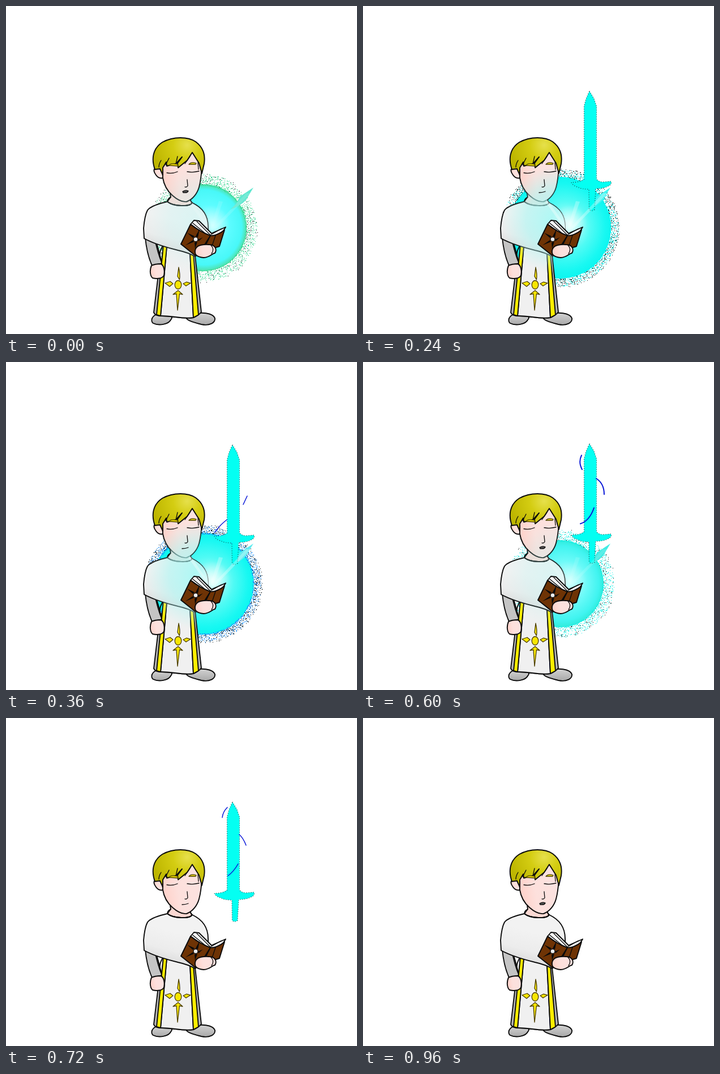
An HTML page that plays this animation: 620 by 580 pixels, repeating every 1.08 s.

```html
<!DOCTYPE html>
<html lang="en">
<head>
<meta charset="utf-8">
<title>Priest summoning a sword</title>
<style>
html, body { margin: 0; width: 100%; height: 100%; overflow: hidden; background: #fff; }
svg { display: block; width: 620px; height: 580px; }
.ink { stroke: #0a0a0a; stroke-width: 1.9; stroke-linejoin: round; stroke-linecap: round; }
.line { fill: none; }
.thin { stroke-width: 1.3; }
.dots { shape-rendering: crispEdges; }
</style>
</head>
<body>
<svg id="stage" viewBox="0 0 620 580">
  <defs>
    <radialGradient id="aura" gradientUnits="userSpaceOnUse" cx="348" cy="392" r="88" fx="366" fy="388">
      <stop id="core" offset="0"/><stop id="mid" offset=".5"/>
      <stop id="rim" offset=".86"/><stop id="edge" offset="1"/>
    </radialGradient>
    <radialGradient id="wash" gradientUnits="userSpaceOnUse" cx="340" cy="378" r="95">
      <stop offset="0" stop-color="#9ffaf6"/>
      <stop offset=".55" stop-color="#aef5f2" stop-opacity=".75"/>
      <stop offset="1" stop-color="#b8f5f2" stop-opacity="0"/>
    </radialGradient>
    <radialGradient id="flare">
      <stop offset="0" stop-color="#fff" stop-opacity=".9"/>
      <stop offset="1" stop-color="#fff" stop-opacity="0"/>
    </radialGradient>
    <radialGradient id="hairFill" gradientUnits="userSpaceOnUse" cx="320" cy="246" r="62">
      <stop offset="0" stop-color="#e6e04c"/><stop offset=".4" stop-color="#d4cd12"/>
      <stop offset="1" stop-color="#bdb500"/>
    </radialGradient>
    <linearGradient id="skin" x1="0" y1=".6" x2="1" y2=".4">
      <stop offset="0" stop-color="#ffd0c8"/><stop offset=".4" stop-color="#fde0dc"/>
      <stop offset="1" stop-color="#fbe2e0"/>
    </linearGradient>
    <linearGradient id="cloth" x1=".35" y1="1" x2=".55" y2=".35">
      <stop offset="0" stop-color="#d4d4d4"/><stop offset=".5" stop-color="#ececec"/>
      <stop offset="1" stop-color="#f2f2f2"/>
    </linearGradient>
    <linearGradient id="shoe" x1="0" y1="0" x2="0" y2="1">
      <stop offset="0" stop-color="#d2d2d2"/><stop offset="1" stop-color="#a8a8a8"/>
    </linearGradient>
    <path id="face" d="M276 276L277 304C279 317 285 327 294 335C303 343 312 347 319 346C330 342 338 331 341 320C344 309 345 300 346 285L331 255L290 258Z"/>
    <path id="cape" d="M285 346C272 349 255 354 250 361Q245 370 243 393L244 411C260 420 284 427 304 432Q322 436 334 443L358 425L357 390C357 373 350 358 329 348Q326 354 308 353Q292 352 285 346Z"/>
    <path id="robe" d="M278 424L273 470L268 483L261 542Q264 548 273 548C290 547 312 554 331 551Q341 547 345 541L334 441Z"/>
    <path id="neck" d="M290 331L291 338L285 346Q293 353 310 353Q326 353 328 348L325 342Z"/>
    <clipPath id="body"><use href="#face"/><use href="#cape"/><use href="#robe"/><use href="#neck"/></clipPath>
  </defs>

  <g id="glow">
    <circle id="disc" cx="348" cy="392" fill="url(#aura)"/>
    <path id="tint" class="dots"/>
    <path id="soot" class="dots" fill="#081010"/>
    <path id="shard" d="M437 321L413 337Q408 350 396 360Q415 353 424 343Z"/>
  </g>
  <path id="sword" fill="#04fff2" stroke="#101818" stroke-width="1.1" stroke-dasharray="1 3" d="M400 146.500L408 160L412.500 173V302Q417 308 426 307L438 306Q440 312 432 315Q424 319 411 319L409 356Q404 360 399.500 356L399 320Q386 320 379 316Q371 314 368 308Q384 308 390.500 302V173L394 160Z"/>
  <path id="sparks" fill="none" stroke="#0a18d8" stroke-linecap="round"/>

  <g class="ink">
    <path fill="url(#shoe)" d="M264 546C256 551 256 558 260 561C270 566 287 563 291 555Q295 551 291 547Z"/>
    <path fill="url(#shoe)" d="M318 551C320 557 334 560 345 563C360 566 370 560 369 552C366 545 355 542 341 543Z"/>
    <path fill="#c4c4c4" d="M246 410C248 430 252 446 258 459L276 455C270 444 268 432 263 414Z"/>
    <path fill="none" d="M265 416Q270 432 274 449M277 424Q267 440 276 453"/>
    <use href="#robe" fill="#b4b4b4"/>
    <path fill="#f0f0f0" d="M284 424L273 548C290 547 312 554 331 551L325 436Z"/>
    <path fill="#ffee00" d="M278 423L284 425L273 548L266 546ZM325 436L331 438L340 546L331 551Z"/>
    <path fill="url(#skin)" d="M257 459C253 468 255 478 259 481C267 483 277 482 279 476C281 467 278 457 273 456Q263 456 257 459Z"/>
    <g class="thin" fill="#f7e600" stroke="#4a3c00">
      <path d="M305 462Q308 475 306.500 484L303 478ZM281 490L290 487L295 491L289 496ZM313 491L319 488L326 490L318 495Z"/>
      <path d="M304 503L312 510L306.500 509L303 538L301 509L295 510Z"/>
      <ellipse cx="304" cy="493" rx="5.800" ry="7.500"/>
    </g>
    <use href="#neck" fill="#fbd8d2"/>
    <use href="#cape" fill="url(#cloth)"/>
    <path fill="none" d="M291 338Q285 341 285 346Q294 353 310 353Q325 354 329 348L325 343"/>
    <path fill="url(#skin)" d="M278 304Q270 306 265 299Q259 291 263 287L277 287Z"/>
    <use href="#face" fill="url(#skin)"/>
  </g>
  <rect id="veil" x="240" y="260" width="120" height="230" fill="url(#wash)" clip-path="url(#body)"/>
  <g id="rays" fill="#fff">
    <circle cx="364" cy="384" r="32" fill="url(#flare)"/>
    <path d="M363 396L424 331L432 331L369 396Z" opacity=".45"/>
    <path d="M361 394L376 345L383 346L366 394Z" opacity=".4"/>
    <path d="M356 394L322 346L327 344L361 394Z" opacity=".5"/>
  </g>
  <g class="ink">
    <path fill="url(#hairFill)" d="M263 289C257 272 258 253 276 241C296 230 322 231 335 240C350 251 352 266 350 279L346 296L341 278L329 259L320 273L304 286L303 278L311 267L300 279L284 283L283 276L277 286V299L272 288Z"/>
    <path class="line thin" d="M270 285Q270 279 274 273M282 281L288 269M300 279L303 266M316 279L325 266M339 277L340 289"/>
    <path class="thin" stroke="#4a4300" fill="#f2dc00" d="M288 282Q291 277 303 280L304 283ZM323 280Q327 275 336 278L335 280Z"/>
    <path class="line thin" d="M284 295Q294 297 303 293M320 293Q330 295 341 292M320 307L321 318Q319 321 316 320"/>
    <path id="mouth" class="thin"/>
    <path fill="#f6f6f6" d="M326 386L332 379L341 380L363 402L388 391L383 399L360 410Z"/>
    <path class="line thin" d="M337 381L361 405L380 394M330 384L358 407"/>
    <path fill="#6e3305" d="M326 386L309 421L334 441L350 426L361 406Q342 399 326 386ZM361 406Q372 407 386 396L377 425L358 431L349 425Z"/>
    <path class="line thin" d="M361 406L351 427M370 406L363 427"/>
    <path fill="#0a0a0a" stroke="none" d="M320 401L333 407L330 410ZM342 394L339 409L335 407ZM348 409L339 413L340 416ZM317 423L330 414L332 417ZM334 429L333 418L338 417Z"/>
    <circle class="thin" cx="335" cy="412.500" r="4" fill="#eee"/>
    <path fill="url(#skin)" d="M334 433C335 424 345 421 359 422C370 422 373 431 369 437C363 438 361 444 349 445C338 444 333 440 334 433Z"/>
    <path class="line thin" d="M362 423Q369 430 363 438"/>
  </g>
</svg>
<script>
const $ = id => document.getElementById(id);
const STEP = 120;

const small = { r: 77, spread: 20, veil: .3, rays: .3, soot: 260 };
const large = { r: 90, spread: 15, veil: .85, rays: .7, soot: 1000,
  stops: ['#d0fffa', '#50faf4', '#18f8f2', '#0cf6f0'] };

const looks = {
  green: { ...small, stops: ['#c0ffff', '#5cfcff', '#48f8f8', '#50e0a8'], dot: '#3cd894', shard: '#60e8d0' },
  cyan: { ...large, dot: '#04f4f0', shard: '#40f6f2' },
  blue: { ...large, dot: '#1e90ff', shard: '#60ecf0' },
  waning: { ...large, r: 84, veil: .6, rays: .5, soot: 600, dot: '#18c8f0', shard: '#50ecec' },
  pale: { ...small, stops: ['#c8fffc', '#6cfaf8', '#40f4f0', '#30ecdc'], dot: '#18eee4', shard: '#40ece4' }
};

const early = 'M426 237L419 252M390 279Q378 288 369 301';
const wide = 'M386 165Q380 177 387 190M412 206Q426 215 426 234M408 258Q400 281 384 286';
const tight = 'M391 158Q383 166 382 176M412 206Q419 212 424 225M410 258Q402 272 392 279';

// y: sword offset, behind: sword still inside the glow, open: mouth
const steps = [
  { look: 'green', open: true },
  { look: 'cyan', y: 9, behind: true },
  { look: 'cyan', y: 4 },
  { look: 'blue', y: 0, sparks: early },
  { look: 'waning', y: -3, sparks: wide },
  { look: 'pale', y: -2, sparks: wide, open: true },
  { y: 2, sparks: tight },
  { y: 5, fade: .6 },
  { open: true }
];

function random(seed) {
  return () => (seed = seed * 16807 % 2147483647) / 2147483647;
}

function speckle(seed, count, r, spread, power) {
  const rnd = random(seed);
  let d = '';
  for (let i = 0; i < count; i++) {
    const a = rnd() * 2 * Math.PI;
    const dist = r - 2 + spread * rnd() ** power;
    d += `M${Math.round(348 + dist * Math.cos(a))} ${Math.round(392 + dist * Math.sin(a))}h1v1h-1z`;
  }
  return d;
}

steps.forEach((s, i) => {
  const g = looks[s.look];
  if (!g) return;
  s.tint = speckle(911 + i * 7919, 2600, g.r, g.spread, 1.8);
  s.soot = speckle(4327 + i * 6007, g.soot, g.r + 2, g.spread, 1.2);
});

function set(id, attrs) {
  for (const k in attrs) $(id).setAttribute(k, attrs[k]);
}
function show(id, on) { set(id, { display: on ? 'inline' : 'none' }); }

function drawGlow(s) {
  const g = looks[s.look];
  ['glow', 'veil', 'rays'].forEach(id => show(id, g));
  if (!g) return;
  set('disc', { r: g.r });
  set('aura', { r: g.r });
  ['core', 'mid', 'rim', 'edge'].forEach((id, k) => set(id, { 'stop-color': g.stops[k] }));
  set('tint', { d: s.tint, fill: g.dot });
  set('soot', { d: s.soot });
  set('shard', { fill: g.shard });
  set('rays', { opacity: g.rays });
  set('veil', { opacity: g.veil });
}

function drawSword(s) {
  const armed = s.y !== undefined;
  show('sword', armed);
  if (armed) {
    set('sword', { transform: `translate(0 ${s.y})`, opacity: s.fade || 1 });
    $('stage').insertBefore($('sword'), $(s.behind ? 'glow' : 'sparks'));
  }
  set('sparks', { d: s.sparks || '', 'stroke-width': s.sparks === wide ? 2 : 1.5 });
}

function draw(s) {
  drawGlow(s);
  drawSword(s);
  set('mouth', s.open
    ? { d: 'M312 328Q317 325 322 327Q321 331 313 330Z', fill: '#555' }
    : { d: 'M311 330Q317 330 322 328', fill: 'none' });
}

let last = -1;
function tick(now) {
  const i = Math.floor(now / STEP) % steps.length;
  if (i !== last) draw(steps[last = i]);
  requestAnimationFrame(tick);
}
draw(steps[0]);
requestAnimationFrame(tick);
</script>
</body>
</html>
```
